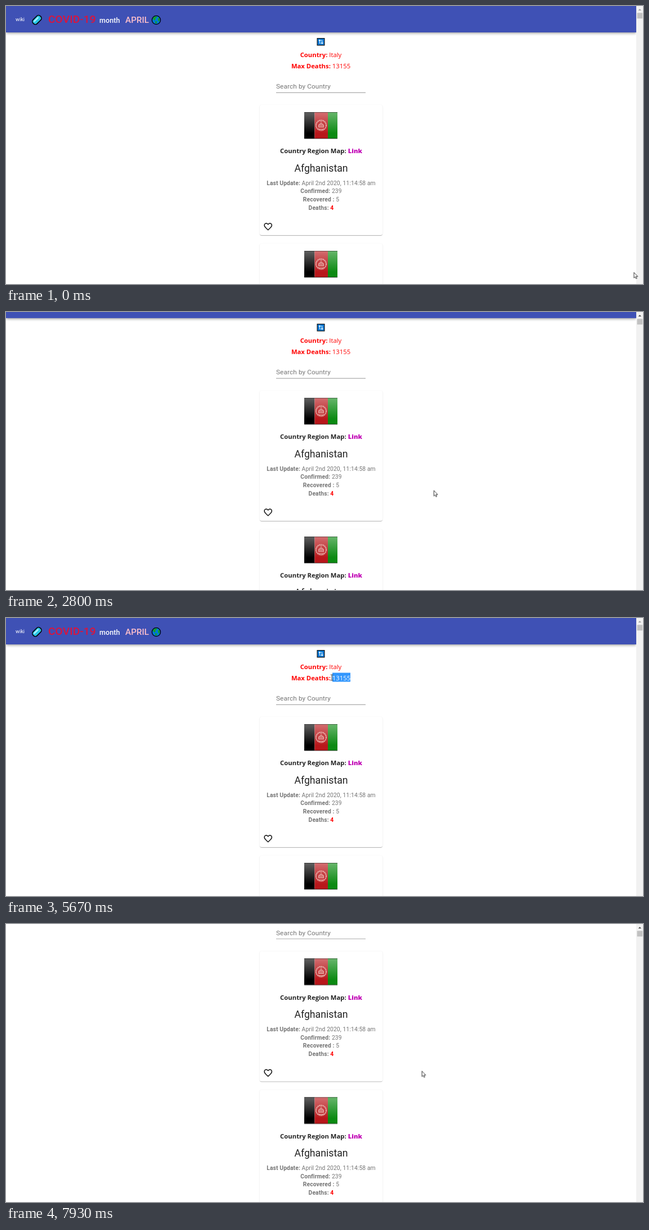
An HTML page for the animation above (8000 ms loop, 1132 by 495 pixels).

```html
<!DOCTYPE html>
<html lang="en">
<head>
<meta charset="utf-8">
<title>COVID-19 cases by country</title>
<style>
  html, body { margin: 0; width: 100%; height: 100%; overflow: hidden; background: #fff; }
  #stage { position: relative; width: 1132px; height: 495px; overflow: hidden; }
  #page, .layer, .layer svg { position: absolute; left: 0; top: 0; width: 1132px; height: 495px; }
  #page, #cursor, #arrow, #beam, .sel, #hover, #up { animation: 8s linear infinite; }
  svg { display: block; overflow: visible; font-family: Roboto, sans-serif; }

  header {
    position: absolute; width: 1119.5px; height: 47px; background: #3f51b5;
    box-shadow: 0 1.5px 3px -.7px rgba(0,0,0,.2), 0 3px 3.7px rgba(0,0,0,.14), 0 .7px 7.4px rgba(0,0,0,.12);
  }
  .card {
    position: absolute; left: 450.5px; width: 218px; height: 231.5px; border-radius: 3px; background: #fff;
    box-shadow: 0 1.5px .7px -.7px rgba(0,0,0,.2), 0 .7px .7px rgba(0,0,0,.14), 0 .7px 2.2px rgba(0,0,0,.12);
  }
  .card svg { width: 100%; height: 100%; }

  .h6 { font-weight: 500; letter-spacing: .0075em; }
  .mid { text-anchor: middle; }
  .sans { font: 11.3px "Open Sans", "Noto Sans", sans-serif; }
  .b { font-weight: 700; }
  .info { font-size: 10.32px; letter-spacing: .01071em; fill: #757575; }

  #page { animation-name: scroll; }
  @keyframes scroll {
    0%, 25.8% { transform: translateY(0); }
    26.64% { transform: translateY(-37.8px); }
    27.6%, 33.5% { transform: translateY(-73.7px); }
    35% { transform: translateY(-36.6px); }
    36.1%, 95.4% { transform: translateY(0); }
    99.13% { transform: translateY(-127.5px); }
    100% { transform: translateY(-140px); }
  }

  #cursor { position: absolute; left: 0; top: 0; width: 0; height: 0; animation-name: move; }
  #cursor svg { position: absolute; width: 1px; height: 1px; }
  @keyframes move {
    0% { transform: translate(1115.5px, 474px); animation-timing-function: ease-in-out; }
    10.8% { transform: translate(817px, 305px); animation-timing-function: ease-out; }
    21.6% { transform: translate(773px, 292px); }
    26.6%, 33.3% { transform: translate(764px, 318px); }
    35% { transform: translate(760px, 317.5px); animation-timing-function: ease-in-out; }
    42%, 44.1% { transform: translate(563px, 142px); }
    49.1%, 50% { transform: translate(527px, 85px); }
    60.8% { transform: translate(612px, 89.5px); }
    63.3%, 65.9% { transform: translate(620px, 110px); }
    70.8%, 75% { transform: translate(579px, 106px); animation-timing-function: ease-in-out; }
    83.3%, 89.1% { transform: translate(749px, 258.5px); }
    92.4%, 94.1% { transform: translate(741.5px, 258px); }
    99.1%, 100% { transform: translate(738.7px, 261.5px); }
  }
  #arrow { animation-name: arrow; animation-timing-function: step-end; }
  #beam { animation-name: beam; animation-timing-function: step-end; }
  @keyframes arrow {
    0%, 59.4%, 78.6%, 100% { opacity: 1; }
    41%, 67% { opacity: 0; }
  }
  @keyframes beam {
    0%, 59.4%, 78.6%, 100% { opacity: 0; }
    41%, 67% { opacity: 1; }
  }

  #hover { animation-name: hover; }
  @keyframes hover {
    0%, 40.5%, 47%, 77%, 80%, 100% { opacity: 0; }
    42%, 45% { opacity: 1; }
    78.4% { opacity: .9; }
  }

  /* text selections: white copies on blue, revealed by a clip */
  .sel { background: #3297fd; }
  #selCountry { animation-name: selCountry; }
  @keyframes selCountry {
    0%, 50% { clip-path: inset(78px 609px 401px 523px); }
    58.8%, 66.5% { clip-path: inset(78px 535px 401px 523px); }
    66.6%, 100% { clip-path: inset(78px 609px 401px 523px); }
  }
  #selDeaths { animation-name: selDeaths; }
  @keyframes selDeaths {
    0%, 66.7% { clip-path: inset(97.5px 520px 381.5px 612px); }
    70.7%, 86.5% { clip-path: inset(97.5px 520px 381.5px 580px); }
    86.6%, 100% { clip-path: inset(97.5px 520px 381.5px 612px); }
  }

  #bar { position: absolute; left: 1119.5px; top: 0; width: 12.5px; height: 495px; background: #f1f1f1; }
  #up { animation-name: up; animation-timing-function: step-end; }
  @keyframes up {
    0%, 36%, 100% { fill: #a3a3a3; }
    25.9%, 95.5% { fill: #505050; }
  }
</style>
</head>
<body>
<svg width="0" height="0" style="position:absolute">
  <defs>
    <linearGradient id="gloss" x2="0" y2="1">
      <stop offset="0" stop-color="#fff" stop-opacity=".38"/>
      <stop offset=".8" stop-color="#fff" stop-opacity="0"/>
    </linearGradient>
    <g id="stats" class="mid sans">
      <text x="559.5" y="91"><tspan class="b">Country:</tspan> Italy</text>
      <text x="559.5" y="110.5"><tspan class="b">Max Deaths:</tspan> 13155</text>
    </g>
    <g id="flag">
      <path d="M0 47.3h59" stroke="#000" stroke-opacity=".35" stroke-width="1.4"/>
      <path fill="#000" d="M0 0h18.5v47H0z"/>
      <path fill="#b8171b" d="M18.5 0H42v47H18.5z"/>
      <path fill="#0b8a12" d="M42 0h17v47H42z"/>
      <path fill="url(#gloss)" d="M0 0h59v47H0z"/>
      <g fill="none" stroke="#f0c4be" stroke-opacity=".75">
        <circle cx="30" cy="23.5" r="9" stroke-width="2.2" stroke-dasharray="2.6 .6"/>
        <path fill="#f0c4be" fill-opacity=".45" stroke-width="1.2" d="M25.5 27v-4l2-1.5q2.5-3.5 5 0l2 1.5v4zM30 18.5v-2.5M24.5 29.5q5.5 2.5 11 0"/>
      </g>
      <path d="M0 .5h59" stroke="#000" stroke-opacity=".45"/>
      <path d="M0 46.5h59" stroke="#000" stroke-opacity=".3"/>
    </g>
    <g id="card">
      <use href="#flag" x="79" y="13"/>
      <g class="mid">
        <text class="sans b" x="109" y="86.3" fill="#212121">Country Region Map: <tspan fill="#c000b4" font-weight="800">Link</tspan></text>
        <text x="109" y="119" font-size="17.69" fill="#212121">Afghanistan</text>
        <g class="info">
          <text x="109" y="142.5"><tspan class="b">Last Update:</tspan> April 2nd 2020, 11:14:58 am</text>
          <text x="109" y="157.2"><tspan class="b">Confirmed:</tspan> 239</text>
          <text x="109" y="172"><tspan class="b">Recovered :</tspan> 5</text>
          <text x="109" y="186.7" class="b">Deaths: <tspan fill="red">4</tspan></text>
        </g>
      </g>
      <path transform="translate(5.9 208) scale(.737)" fill="#111" d="M16.5 3c-1.74 0-3.41.81-4.5 2.09C10.91 3.81 9.24 3 7.5 3 4.42 3 2 5.42 2 8.5c0 3.78 3.4 6.86 8.55 11.54L12 21.35l1.45-1.32C18.6 15.36 22 12.28 22 8.5 22 5.42 19.58 3 16.5 3zm-4.4 15.55l-.1.1-.1-.1C7.14 14.24 4 11.39 4 8.5 4 6.5 5.5 5 7.5 5c1.54 0 3.04.99 3.57 2.36h1.87C13.46 5.99 14.96 5 16.5 5c2 0 3.5 1.5 3.5 3.5 0 2.89-3.14 5.74-7.9 10.05z"/>
    </g>
  </defs>
</svg>

<div id="stage">
  <div id="page">
    <header></header>
    <div class="card" style="top:176px"><svg><use href="#card"/></svg></div>
    <div class="card" style="top:422.8px"><svg><use href="#card"/></svg></div>
    <div class="card" style="top:669.6px"><svg><use href="#card"/></svg></div>

    <div class="layer"><svg>
      <!-- header -->
      <text x="17" y="26.5" font-size="9.2" fill="#fff">wiki</text>
      <g transform="translate(55 24.7) rotate(-45)" stroke="#000">
        <rect x="-9" y="-5" width="18" height="10" rx="4.5" fill="#29c5e6" stroke-width="1.6"/>
        <path d="M-5 -1.5h9" stroke="#b5f1fb" stroke-width="2.4" stroke-linecap="round"/>
      </g>
      <g class="h6">
        <text x="75" y="30.4" font-size="19.1" fill="#dc143c">COVID-19</text>
        <text x="166" y="30.4" font-size="12.5" fill="#fff">month</text>
        <text x="212" y="30.4" font-size="15.1" fill="#ffc0cb">APRIL</text>
      </g>
      <g transform="translate(267 25)">
        <circle r="7.6" fill="#0078d7" stroke="#000" stroke-width="1.3"/>
        <path fill="#16a01c" d="M-6-3Q-3-7 1-6.5L1-4.5-2-2.5-1-.5-3 .5-5-1zM3-3L5.5-4Q7 0 5 3L3.5 1zM-1.5 2L1.5 3 0 6.6Q-1.5 6-2 4z"/>
      </g>

      <!-- refresh button -->
      <path fill="#0078d7" stroke="#111" stroke-width="1.2" d="M553.1 57.6h12.8v12.3h-12.8z"/>
      <path fill="none" stroke="#fff" stroke-width="1.1" d="M557.6 60.6v5.2q0 1 1.2 1M555.8 62.2l1.8-1.8 1.6 1.8M561.6 67v-5.2q0-1-1.2-1M560 65.4l1.6 1.8 1.8-1.8"/>

      <use href="#stats" fill="red"/>

      <!-- search field -->
      <text x="480" y="147.2" font-size="11.79" letter-spacing=".11" fill="#757575">Search by Country</text>
      <path fill="#949494" d="M480 153.8h159v.9H480z"/>
      <path id="hover" fill="#303030" d="M480 153.3h159v1.4H480z"/>
    </svg></div>

    <div class="layer sel" id="selCountry"><svg><use href="#stats" fill="#fff"/></svg></div>
    <div class="layer sel" id="selDeaths"><svg><use href="#stats" fill="#fff"/></svg></div>
  </div>

  <div id="bar"><svg width="12.5" height="495">
    <path id="up" d="M3.6 8L6.3 5 9 8z"/>
    <path fill="#c1c1c1" d="M1.5 12.3h9.6v10H1.5z"/>
  </svg></div>

  <div id="cursor">
    <svg id="arrow"><path fill="#fff" stroke="#222" stroke-width=".9" stroke-linejoin="round" d="M.4.4V10.2L2.6 8.2 4.1 11.6 5.7 10.9 4.2 7.6H7.2z"/></svg>
    <svg id="beam"><path fill="none" stroke="#222" stroke-width=".9" d="M-2.2-5H-.6L0-4.5.6-5H2.2M0-4.5V4.5M-2.2 5H-.6L0 4.5.6 5H2.2"/></svg>
  </div>
</div>
</body>
</html>
```
